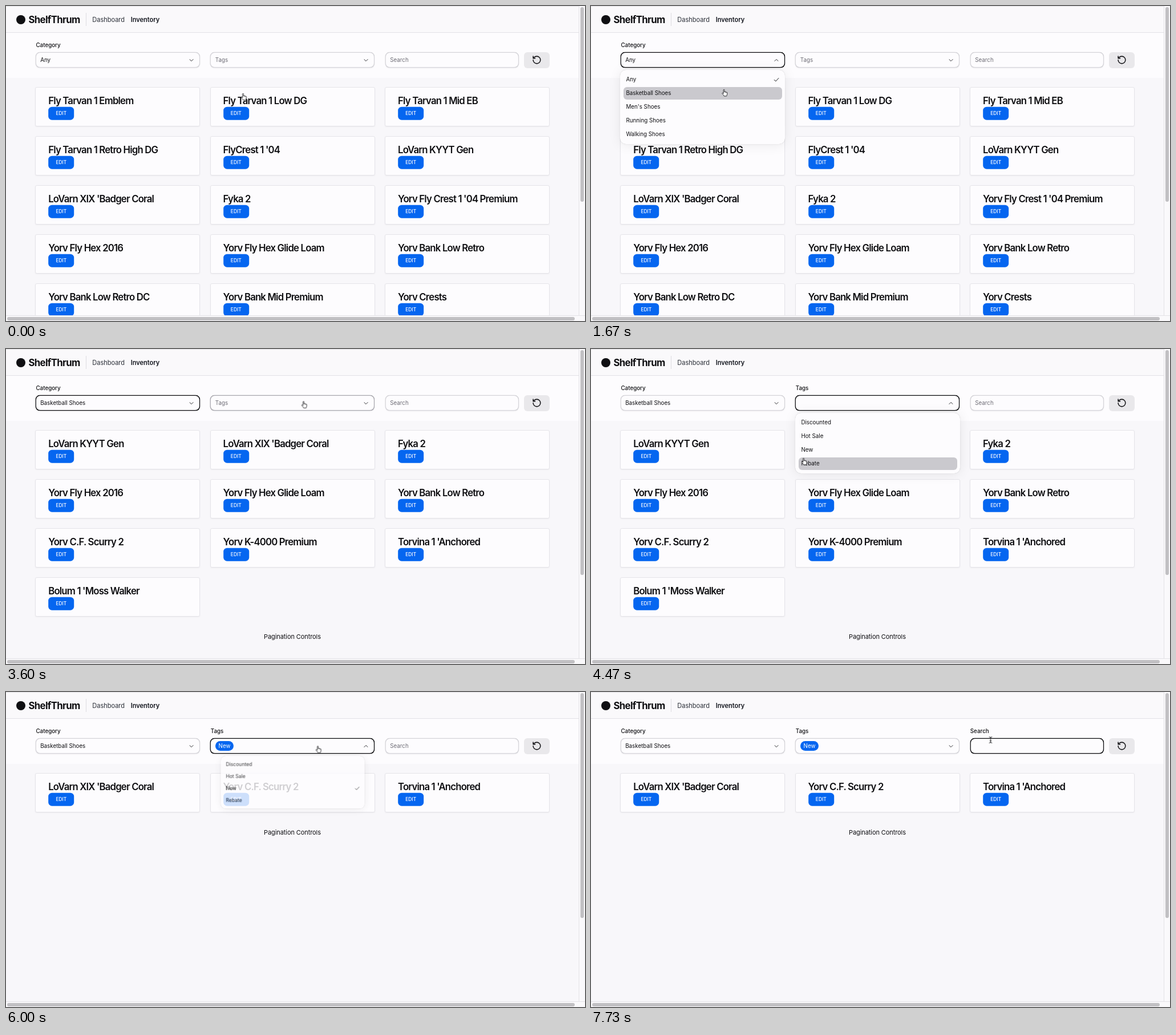
An HTML page that plays this animation: 1015x552 px, repeating every 8000 ms.

```html
<!DOCTYPE html>
<html lang="en">
<head>
<meta charset="utf-8">
<title>Inventory</title>
<style>
html, body { margin: 0; width: 100%; height: 100%; overflow: hidden; }
body { font: 9.8px/14px Inter, "Open Sans", sans-serif; font-optical-sizing: none; color: #0f0f12; }
#stage { position: relative; width: 1015px; height: 552px; overflow: hidden; background: #f8f7fa; }
#stage * { position: absolute; box-sizing: border-box; white-space: nowrap; }
svg { overflow: visible; fill: none; stroke: #18181b; stroke-linecap: round; stroke-linejoin: round; }

/* header */
nav { left: 0; top: 0; width: 1005px; height: 47px; background: #faf9fb; border: solid #e3e2e6; border-width: 1px 0; }
.mark { left: 18px; top: 15px; width: 16px; height: 16px; border-radius: 50%; background: #0f0f12; }
.brand { left: 39.5px; top: 12px; font-size: 16.8px; line-height: 22px; font-weight: 700; letter-spacing: -.04em; }
.rule { left: 140px; top: 11px; width: 1px; height: 23px; background: #dddce1; }
.link { top: 15.5px; font-size: 11.1px; letter-spacing: -.005em; color: #2b2f38; }
.link.on { font-weight: 600; color: #14171f; }

/* filters */
.filters { left: 0; top: 47px; width: 1005px; height: 79px; background: #fdfcfe; }
.field { top: 81px; width: 289px; height: 28px; border-radius: 8.4px; background: #fdfcfe; color: #d5d4d9;
  transform: translate(.4px, -.4px); box-shadow: inset 0 0 0 1.5px currentColor, 0 1px 2px rgba(0,0,0,.05); }
.val { left: 60.2px; top: 87.5px; }
.label { top: 87.5px; color: #6d6c75; }
.chev { top: 94.5px; width: 1px; height: 1px; stroke-width: 1; stroke: #2e2e33; transform-origin: 0 0; }
.chip { left: 367px; top: 85.8px; width: 32px; height: 17.4px; border-radius: 9px; background: #0566f0; color: #fff; text-align: center; line-height: 17.4px; }
.reset { left: 908px; top: 80.5px; width: 45.2px; height: 28.2px; border-radius: 6px; background: #e9e8eb; }
.reset svg { left: 14.1px; top: 5px; stroke-width: 2.2; }
.caret { left: 673.6px; top: 89px; width: 1px; height: 12px; background: #0f0f12; }

/* results */
.list { left: 0; top: 0; width: 1005px; height: 542px; overflow: hidden; }
.card { width: 289px; height: 69px; border: 1px solid #e5e4e9; border-radius: 3px; background: #fdfcfe; box-shadow: 0 1px 2px rgba(0,0,0,.05); }
.card b { left: 22px; top: 12px; font-size: 16.8px; line-height: 22px; font-weight: 600; letter-spacing: -.05em; }
.card i { left: 22px; top: 33.8px; width: 45px; height: 22.4px; border-radius: 6.4px; background: #0566f0; color: #fff;
  transform: translate(.2px, -.3px); font: 500 8.4px/22.4px Inter, sans-serif; text-align: center; }
.foot { left: 0; width: 1004px; text-align: center; font-size: 11px; letter-spacing: -.008em; }

/* menus */
.menu { top: 112px; width: 289.2px; border-radius: 10px; background: #fdfcfe; transform-origin: 50% 0;
  box-shadow: 0 0 10px rgba(0,0,0,.03), 0 1.5px 21px rgba(0,0,0,.08), 0 0 1px rgba(0,0,0,.25); }
.menu span { left: 10.4px; }
.hot { left: 5.6px; top: 5.7px; width: 278px; height: 22.5px; border-radius: 6px; background: #cac9ce; }
.check { left: 269.5px; width: 8px; height: 8px; stroke-width: 1; }

/* scroll bars */
.bar { background: #faf9fb; border: 0 solid #e3e2e6; }
.bar i { background: #c1c0c3; border-radius: 3px; }
.bar.v { left: 1004px; top: 0; width: 11px; height: 552px; border-left-width: 1px; }
.bar.v i { left: 2px; top: 2px; width: 6px; height: 341px; }
.bar.h { left: 0; top: 542px; width: 1015px; height: 10px; border-top-width: 1px; }
.bar.h i { left: 2px; top: 2px; width: 995px; height: 6px; }

#cursor { left: 0; top: 0; width: 0; height: 0; }
.hand { left: -4px; top: 0; stroke-width: .9; fill: #fff; }
.beam { left: -3px; top: -6px; stroke-width: 1; }

/* one 8 s clock: 1% is 80 ms */
.all, .any { animation: first 8s step-end infinite; }
.any { animation-name: any; }
.mid { animation: mid 8s step-end infinite; }
.few { animation: few 8s step-end infinite; }
.ball { animation: ball 8s step-end infinite; }
.picked { animation: picked 8s step-end infinite; }
.thumb { animation: thumb 8s step-end infinite; }
.caret { animation: caret 8s step-end infinite; }
.hand { animation: hand 8s step-end infinite; }
.beam { animation: beam 8s step-end infinite; }
.cat.field { animation: catField 8s linear infinite; }
.tag.field { animation: tagField 8s linear infinite; }
.find.field { animation: findField 8s linear infinite; }
.cat.chev { animation: catChev 8s linear infinite; }
.tag.chev { animation: tagChev 8s linear infinite; }
.tag.label { animation: tagLabel 8s ease-out infinite; }
.find.label { animation: findLabel 8s ease-out infinite; }
.cat.menu { animation: catMenu 8s linear infinite; }
.tag.menu { animation: tagMenu 8s linear infinite; }
.cat .hot { animation: catHot 8s step-end infinite; }
.tag .hot { animation: tagHot 8s step-end infinite; }
#cursor { animation: move 8s ease-in-out infinite; }

@keyframes first { 29%, to { visibility: hidden } }
@keyframes mid { from { visibility: hidden } 29% { visibility: visible } 62%, to { visibility: hidden } }
@keyframes few { from { visibility: hidden } 62%, to { visibility: visible } }
@keyframes any { 25%, to { visibility: hidden } }
@keyframes ball { from { visibility: hidden } 25%, to { visibility: visible } }
@keyframes picked { from { visibility: hidden } 59.5%, to { visibility: visible } }
@keyframes thumb { from { height: 341px } 29%, to { height: 394px } }
@keyframes caret { from { visibility: hidden } 90.7% { visibility: visible } 96.6%, to { visibility: hidden } }
@keyframes hand { 86.4%, to { visibility: hidden } }
@keyframes beam { from { visibility: hidden } 86.4%, to { visibility: visible } }

@keyframes catField {
  0%, 12.5% { color: #d5d4d9 } 13.5%, 14.2% { color: #a5a4ab }
  15.6%, 48.3% { color: #0c0c0f } 49.8%, to { color: #d5d4d9 }
}
@keyframes tagField {
  0%, 42.3% { color: #d5d4d9 } 43.8%, 48.3% { color: #a9a8af }
  49.8%, 90.6% { color: #0c0c0f } 92.5%, to { color: #d5d4d9 }
}
@keyframes findField {
  0%, 86.4% { color: #d5d4d9 } 88.2%, 90.6% { color: #a9a8af } 92.5%, to { color: #0c0c0f }
}
@keyframes catChev {
  0%, 15% { transform: none } 17%, 25% { transform: rotate(180deg) } 27%, to { transform: none }
}
@keyframes tagChev {
  0%, 48.5% { transform: none } 50.5%, 75.2% { transform: rotate(180deg) } 77.2%, to { transform: none }
}
@keyframes tagLabel {
  0%, 48.4% { transform: none; color: #6d6c75; font-weight: 400 }
  51%, to { transform: translate(-8px, -26px); color: #0f0f12; font-weight: 500 }
}
@keyframes findLabel {
  0%, 90.6% { transform: none; color: #6d6c75; font-weight: 400 }
  93.3%, to { transform: translate(-8.4px, -26px); color: #0f0f12; font-weight: 500 }
}
@keyframes catMenu {
  0%, 15.2% { transform: scale(.8); opacity: 0; animation-timing-function: cubic-bezier(.2, .8, .3, 1) }
  20%, 25% { transform: none; opacity: 1 }
  26.1% { transform: scale(.873); opacity: .82 }
  28.1%, to { transform: scale(.85); opacity: 0 }
}
@keyframes tagMenu {
  0%, 48.5% { transform: scale(.8); opacity: 0; animation-timing-function: cubic-bezier(.2, .8, .3, 1) }
  53.3%, 73.9% { transform: none; opacity: 1 }
  75% { transform: scale(.873); opacity: .82 }
  77%, to { transform: scale(.85); opacity: 0 }
}
@keyframes catHot {
  0% { opacity: 0; transform: none } 18.7% { opacity: 1; transform: none }
  20.1%, to { opacity: 1; transform: translateY(24px) }
}
@keyframes tagHot {
  0% { opacity: 0; transform: none }
  51.5% { opacity: 1; transform: none }
  52.4% { opacity: 1; transform: translateY(24px) }
  53.4% { opacity: 1; transform: translateY(48px) }
  55.3% { opacity: 1; transform: translateY(72px) }
  56.6% { opacity: 1; transform: translateY(48px) }
  71.4% { opacity: 1; transform: translateY(24px) }
  72.1% { opacity: 1; transform: none }
  72.7%, to { opacity: 0; transform: none }
}
@keyframes move {
  0%, .5% { transform: translate(415.5px, 153px) }
  3.4%, 5.5% { transform: translate(402px, 146px) }
  14%, 16.75% { transform: translate(234px, 92px) }
  20.75%, 37.2% { transform: translate(233px, 146px) }
  44.8%, 49.1% { transform: translate(521.5px, 91.5px) }
  55.6%, 56% { transform: translate(372.5px, 191px) }
  58.2%, 61% { transform: translate(380px, 182px) }
  64.5%, 70% { transform: translate(392.5px, 190px) }
  74.2%, 80.9% { transform: translate(546.5px, 94.5px) }
  89.1%, to { transform: translate(700.5px, 84px) }
}
</style>
</head>
<body>
<div id="stage">
  <nav>
    <div class="mark"></div>
    <span class="brand">ShelfThrum</span>
    <div class="rule"></div>
    <span class="link" style="left:151.3px">Dashboard</span>
    <span class="link on" style="left:218.8px">Inventory</span>
  </nav>

  <div class="filters"></div>
  <span style="left:52.4px;top:61.5px;font-weight:500">Category</span>
  <div class="field cat" style="left:51px"></div>
  <span class="val any">Any</span>
  <span class="val ball">Basketball Shoes</span>
  <svg class="chev cat" style="left:324.7px"><path d="M-3.1-1.5 0 1.6 3.1-1.5"/></svg>

  <div class="field tag" style="left:357px"></div>
  <span class="label tag" style="left:366.8px">Tags</span>
  <span class="chip picked">New</span>
  <svg class="chev tag" style="left:631.3px"><path d="M-3.1-1.5 0 1.6 3.1-1.5"/></svg>

  <div class="field find" style="left:664px;width:235px"></div>
  <span class="label find" style="left:673.2px">Search</span>
  <div class="caret"></div>
  <div class="reset"><svg width="17" height="17" viewBox="0 0 24 24"><path d="M3 12a9 9 0 1 0 9-9 9.75 9.75 0 0 0-6.74 2.74L3 8M3 3v5h5"/></svg></div>

  <div id="lists"></div>
  <div id="menus"></div>

  <div class="bar v"><i class="thumb"></i></div>
  <div class="bar h"><i></i></div>

  <div id="cursor">
    <svg class="hand" width="11" height="13"><path d="M3.2 7.2V1.2a.9.9 0 0 1 1.8 0V5a.8.8 0 0 1 1.6 0v.3a.8.8 0 0 1 1.6.1v.4a.75.75 0 0 1 1.5.2v2.5c0 1.6-.9 2-1.1 3.4H4.3C4 10.6 2.4 9.3 1 7.6c-.7-1 .5-1.8 1.2-1.1z"/></svg>
    <svg class="beam" width="6" height="12"><path d="M.8.7Q3 .7 3 2.2 3 .7 5.2.7M3 2v8M.8 11.3Q3 11.3 3 9.8q0 1.5 2.2 1.5M2 7.6h2"/></svg>
  </div>
</div>

<script>
const lists = {
  all: ["Fly Tarvan 1 Emblem", "Fly Tarvan 1 Low DG", "Fly Tarvan 1 Mid EB",
    "Fly Tarvan 1 Retro High DG", "FlyCrest 1 '04", "LoVarn KYYT Gen",
    "LoVarn XIX 'Badger Coral", "Fyka 2", "Yorv Fly Crest 1 '04 Premium",
    "Yorv Fly Hex 2016", "Yorv Fly Hex Glide Loam", "Yorv Bank Low Retro",
    "Yorv Bank Low Retro DC", "Yorv Bank Mid Premium", "Yorv Crests"],
  mid: ["LoVarn KYYT Gen", "LoVarn XIX 'Badger Coral", "Fyka 2",
    "Yorv Fly Hex 2016", "Yorv Fly Hex Glide Loam", "Yorv Bank Low Retro",
    "Yorv C.F. Scurry 2", "Yorv K-4000 Premium", "Torvina 1 'Anchored",
    "Bolum 1 'Moss Walker"],
  few: ["LoVarn XIX 'Badger Coral", "Yorv C.F. Scurry 2", "Torvina 1 'Anchored"]
};
const menus = [
  { name: "cat", left: 51.1, checked: 0, items: ["Any", "Basketball Shoes", "Men's Shoes", "Running Shoes", "Walking Shoes"] },
  { name: "tag", left: 357.6, checked: 2, items: ["Discounted", "Hot Sale", "New", "Rebate"] }
];

const card = (name, i) =>
  `<div class="card" style="left:${51.2 + i % 3 * 306.4}px;top:${142.4 + Math.floor(i / 3) * 86}px"><b>${name}</b><i>EDIT</i></div>`;

const list = ([name, cards]) =>
  `<div class="list ${name}">${cards.map(card).join("")}
  <span class="foot" style="top:${152.5 + Math.ceil(cards.length / 3) * 86}px">Pagination Controls</span></div>`;

const menu = ({ name, left, checked, items }) =>
  `<div class="menu ${name}" style="left:${left}px;height:${9.9 + items.length * 24}px"><div class="hot"></div>
  ${items.map((text, i) => `<span style="top:${10 + i * 24}px">${text}</span>`).join("")}
  <svg class="check ${name === "tag" ? "picked" : ""}" style="top:${13 + checked * 24}px"><path d="M.2 4.4 2.8 7 7.9 1.4"/></svg></div>`;

document.getElementById("lists").innerHTML = Object.entries(lists).map(list).join("");
document.getElementById("menus").innerHTML = menus.map(menu).join("");
</script>
</body>
</html>
```
